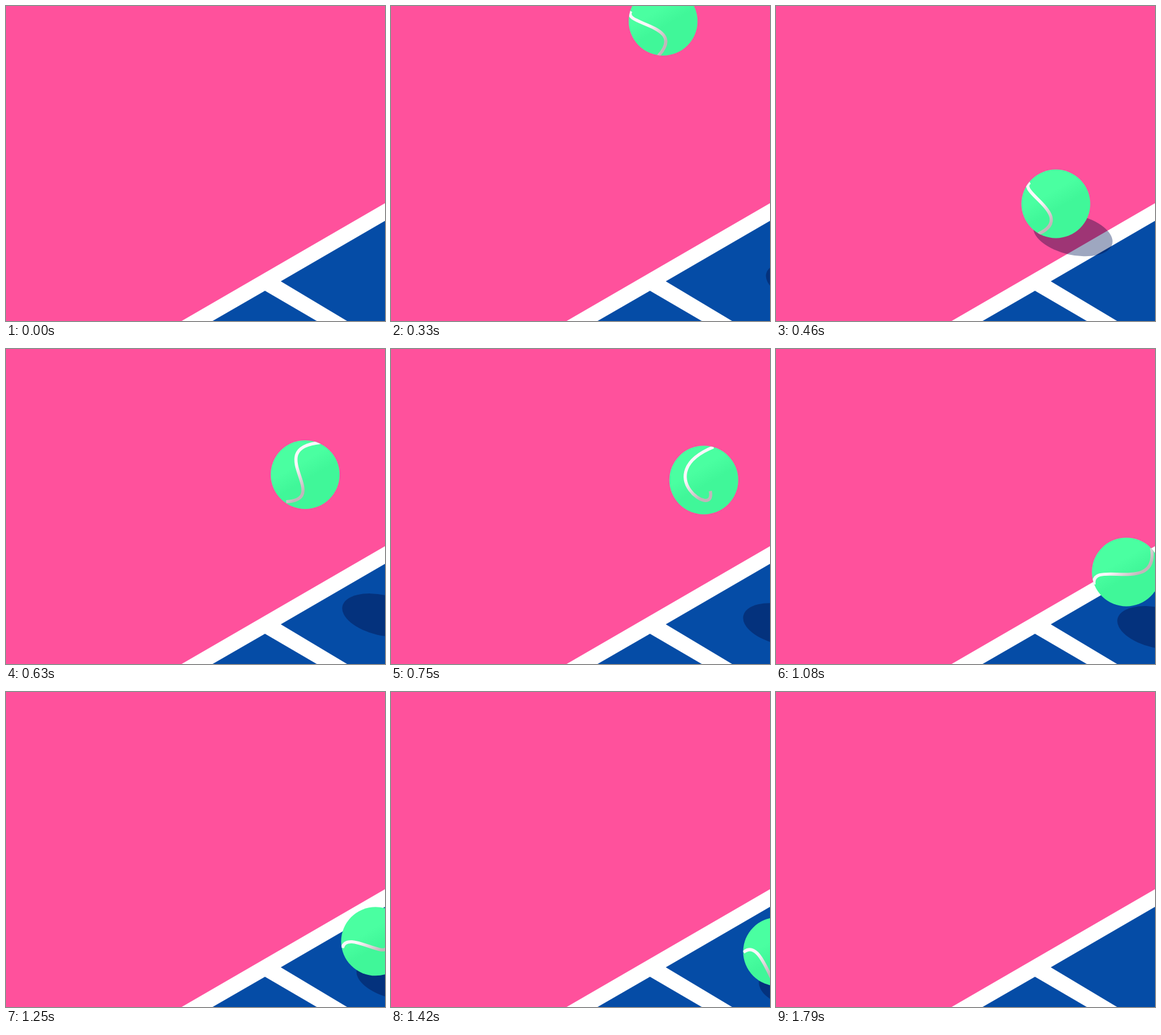
An HTML page with a canvas for the animation above (3.5 s loop, 600 by 500 pixels).

```html
<!DOCTYPE html>
<html lang="en">
<head>
<meta charset="utf-8">
<title>Bouncing tennis ball</title>
<style>
html, body { margin: 0; width: 100%; height: 100%; overflow: hidden; background: #ff519c; }
canvas { display: block; }
</style>
</head>
<body>
<canvas id="stage" width="600" height="500"></canvas>
<script>
const ctx = document.getElementById('stage').getContext('2d');
const LOOP = 3500, START = 290, HIT = 460, ROLL = 1420, END = 1790, R = 54.5;

// The seam is one cubic curve, relative to the ball centre, that turns through these poses
const seams = [
  { time: HIT, points: [-41, -34, -64, -20, 34, 20, -28, 48] },
  { time: 630, points: [24, -51, -68, -42, 43, 39, -30, 43] },
  { time: 880, points: [6, -54, -108, 24, -5, 92, 54, -10] },
  { time: 1080, points: [-51, 20, -59, -22, 52, 38, 40, -38] },
  { time: ROLL, points: [-54, 1, -34, -16, -20, 20, -4, 54] }
];

// Height above the ground after the first hit: ever shorter parabolas
function bounce(u) {
  for (let span = 473; span > 20; span *= 0.45) {
    if (u < span) return 0.00257 * u * (span - u);
    u -= span;
  }
  return 0;
}

function ballAt(t) {
  const u = t - HIT;
  const x = 443 + (u < 0 ? 0.094 : 0.18) * u - 0.000085 * Math.max(0, u - 750) ** 2;
  const h = u < 0 ? -2.5 * u - 0.0025 * u * u : bounce(u);
  return { x, y: 314 + 0.581 * (x - 443) - h, h, u };
}

function seamAt(t) {
  const last = seams.length - 1;
  const i = Math.min(last, Math.max(1, seams.findIndex(s => s.time > t)));
  const next = t < ROLL ? i : last;
  const a = seams[next - 1], b = seams[next];
  const k = Math.min(1, Math.max(0, (t - a.time) / (b.time - a.time)));
  return a.points.map((p, j) => p + (b.points[j] - p) * k);
}

function polygon(color, ...p) {
  ctx.fillStyle = color;
  ctx.beginPath();
  for (let i = 0; i < p.length; i += 2) ctx.lineTo(p[i], p[i + 1]);
  ctx.fill();
}

function gradient(x0, y0, x1, y1, from, to) {
  const g = ctx.createLinearGradient(x0, y0, x1, y1);
  g.addColorStop(0, from);
  g.addColorStop(1, to);
  return g;
}

function court() {
  ctx.fillStyle = '#ff519c';
  ctx.fillRect(0, 0, 600, 500);
  polygon('#fff', 278, 500, 600, 313, 600, 500);
  polygon('#054ca6', 435, 437, 600, 341, 600, 500, 540, 500);
  polygon('#054ca6', 327, 500, 410, 452, 492, 500);
}

function shadow({ x, y, h, u }) {
  ctx.save();
  ctx.globalCompositeOperation = 'multiply';
  ctx.fillStyle = 'rgb(158,167,192)';
  ctx.beginPath();
  ctx.ellipse(x + 27 + 0.0063 * u + 0.705 * h, y + 49 + 0.0115 * u + 1.3 * h,
    64, 32, 0.227, 0, 2 * Math.PI);
  ctx.fill();
  ctx.restore();
}

function ball({ x, y }, t) {
  ctx.save();
  ctx.translate(x, y);
  ctx.fillStyle = gradient(-10, -17, 4, 7, '#4affa1', '#40f799');
  ctx.beginPath();
  ctx.arc(0, 0, R, 0, 2 * Math.PI);
  ctx.fill();
  ctx.clip();

  const [x0, y0, ...rest] = seamAt(t);
  ctx.strokeStyle = gradient(-14, -14, 12, 12, '#fbf7fb', '#c2b5ba');
  ctx.lineWidth = 5;
  ctx.rotate((Math.min(t - HIT, 0) + Math.max(t - ROLL, 0)) * 0.003);
  ctx.beginPath();
  ctx.moveTo(x0, y0);
  ctx.bezierCurveTo(...rest);
  ctx.stroke();
  ctx.restore();
}

function draw(now) {
  // 24 steps per second, on a 10 ms clock
  const step = Math.floor((now % LOOP + 4) * 0.024);
  const t = Math.round(step * 100 / 24) * 10;
  court();
  if (t >= START && t < END) {
    const pose = ballAt(t);
    shadow(pose);
    ball(pose, t);
  }
}

let begin;
function tick(now) {
  begin ??= now;
  draw(now - begin);
  requestAnimationFrame(tick);
}
draw(0);
requestAnimationFrame(tick);
</script>
</body>
</html>
```
